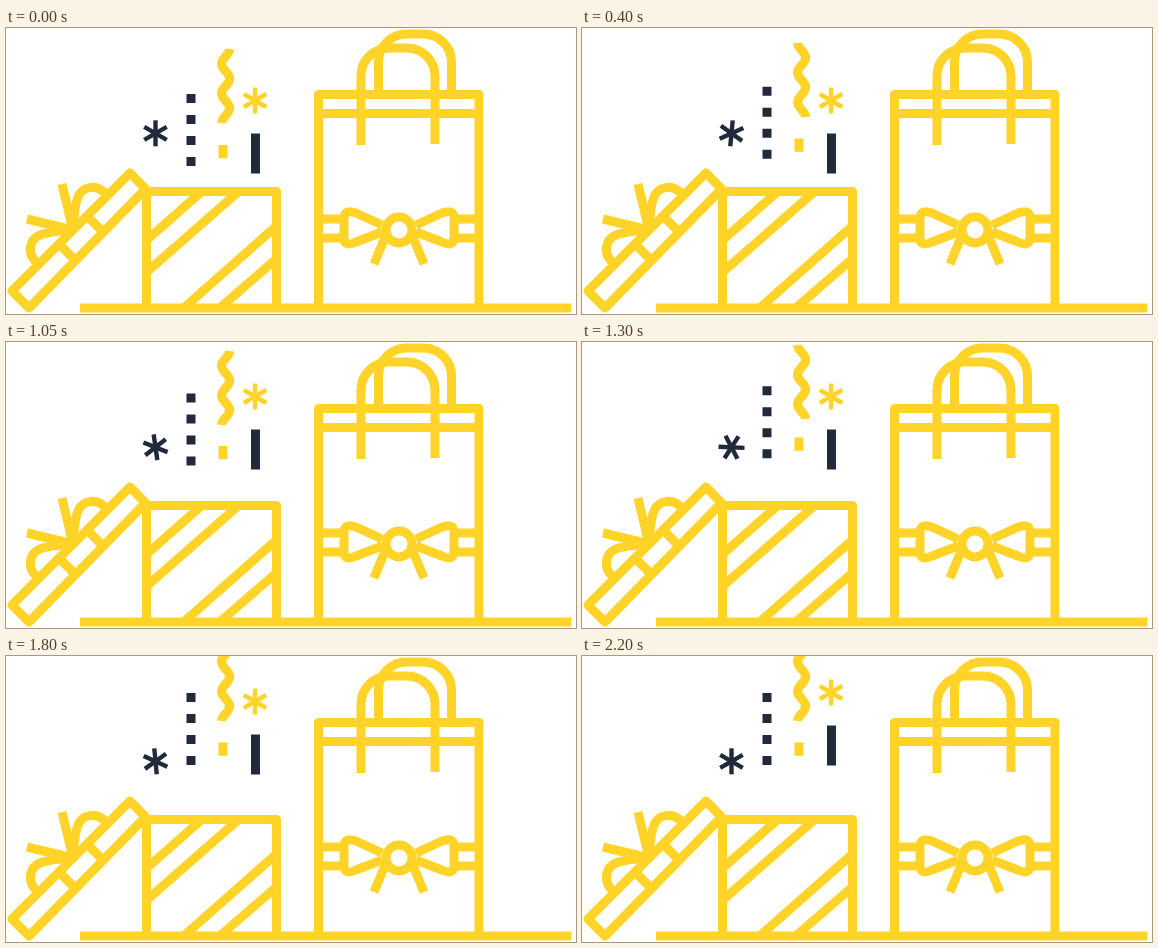
Animation, 570 px wide and 286 px high, one loop 2.25 s. Source, as an HTML page with a canvas:

```html
<!DOCTYPE html>
<html lang="en">
<head>
<meta charset="utf-8">
<title>Gift box and bag</title>
<style>
html, body { margin: 0; width: 100%; height: 100%; overflow: hidden; background: #fff; }
canvas { display: block; }
</style>
</head>
<body>
<canvas id="stage" width="570" height="286"></canvas>
<script>
const ctx = document.getElementById('stage').getContext('2d');
const YELLOW = '#ffd328', DARK = '#212a3a';
const LOOP = 2250, TICK = 50, TURN_TICKS = 44;

function stroke(path, color = YELLOW, width = 9) {
  ctx.strokeStyle = color;
  ctx.lineWidth = width;
  ctx.stroke(new Path2D(path));
}

function block(x, y, w, h, color) {
  ctx.fillStyle = color;
  ctx.fillRect(x, y, w, h);
}

function star(x, y, color, turn = 0) {
  ctx.save();
  ctx.translate(x, y);
  ctx.rotate(turn);
  for (let i = 0; i < 3; i++) {
    stroke('M0 -13V13', color, 4.4);
    ctx.rotate(Math.PI / 3);
  }
  ctx.restore();
}

function box() {
  stroke('M140.5 280V163.5H270.5V280');
  ctx.save();
  ctx.beginPath();
  ctx.rect(140, 163, 131, 117);
  ctx.clip();
  stroke('M134 218L202 158M134 250L240 157M172 285L276 193M208 285L276 226');
  ctx.restore();
}

function lid() {
  stroke('M124 145L139.5 161L23 280L6 263Z');
  stroke('M81 188L97 204M53 216L69 232');
  // The two halves of the bow mirror each other across the diagonal.
  for (const flip of [false, true]) {
    ctx.save();
    ctx.translate(66, 201);
    if (flip) ctx.transform(0, 1, 1, 0, 0, 0);
    stroke('M0 -3L-10 -45');
    stroke('M1 -2C2 -14 3 -25 6 -32C10 -42 24 -46 34 -35');
    ctx.restore();
  }
}

function bag() {
  stroke('M312.5 280V66.5H473V280M312.5 85.5H473');
  stroke('M372.5 66V34A28 28 0 0 1 400.5 6H417.5A28 28 0 0 1 445.5 34V66');
  stroke('M355 117V48A28 28 0 0 1 383 20H401A28 28 0 0 1 429 48V116');
  for (const side of [-1, 1]) {
    ctx.save();
    ctx.translate(393, 202);
    ctx.scale(side, 1);
    stroke('M55 -11H80M55 8H80');
    stroke('M17 -5L43 -17Q54 -21 55 -13V9Q54 17 43 12L17 2');
    stroke('M13 5L25 34');
    ctx.restore();
  }
  stroke('M406 202A13 13 0 1 1 380 202A13 13 0 1 1 406 202Z');
}

function streamer(top, side) {
  const n = 5, half = 14.8;
  let path = '';
  for (let y = 0; y <= n * half; y++) {
    const x = 219.6 + side * 4 * Math.cos(Math.PI * y / half);
    path += (y ? 'L' : 'M') + x + ' ' + (top + y);
  }
  stroke(path);
}

// Number of jumps made so far, one every ten ticks from the first.
const jumps = (tick, first) =>
  Math.max(0, Math.min(4, Math.floor((tick - first) / 10) + 1));

function confetti(tick) {
  const a = jumps(tick, 5), b = jumps(tick, 6), c = jumps(tick, 10);

  streamer([21, 15, 9, 3, -9][a], a % 2 ? -1 : 1);
  block(212.5, [117, 110.5, 104, 95.5, 86.5][a], 9, 13.3, YELLOW);

  for (let i = 0; i < 4; i++) block(180.5, 66 - 7.25 * b + 21 * i, 9, 9, DARK);

  star(249, 72.5 - 9 * c, YELLOW);
  block(245, 105.5 - 9 * c, 9, 40, DARK);

  star(149.5, 105.3, DARK, tick / TURN_TICKS * 2 * Math.PI);
}

function draw(now) {
  const tick = Math.floor((now % LOOP) / TICK);
  ctx.fillStyle = '#fff';
  ctx.fillRect(0, 0, 570, 286);
  ctx.lineJoin = 'round';
  box();
  lid();
  bag();
  stroke('M74 280H565.5');
  confetti(tick);
}

let start;
function loop(now) {
  start ??= now;
  draw(Math.max(0, now - start));
  requestAnimationFrame(loop);
}
draw(0);
requestAnimationFrame(loop);
</script>
</body>
</html>
```
